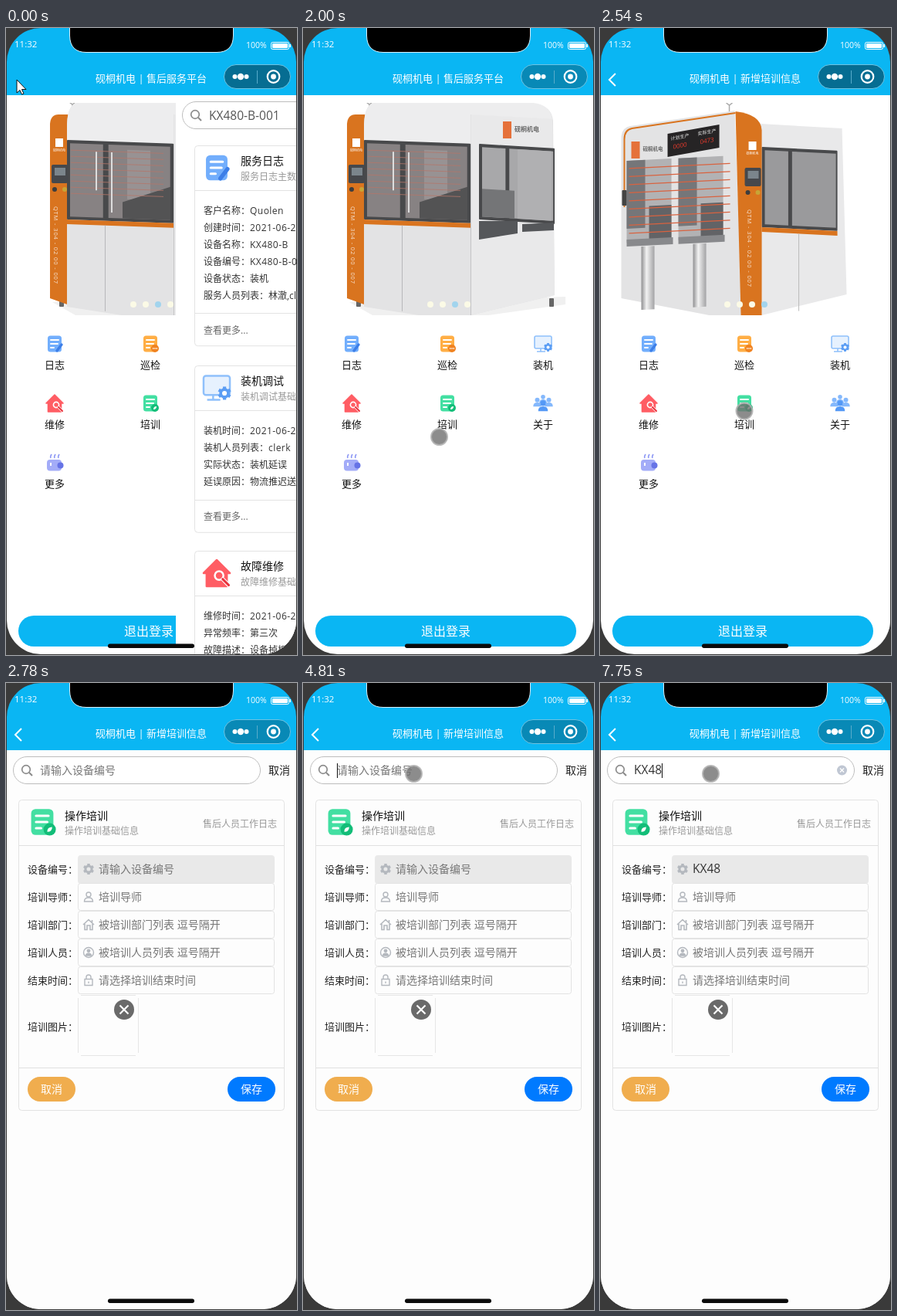
These frames come from a looping animation (377 by 812 pixels, 8 s). An HTML page:

```html
<!DOCTYPE html>
<html lang="zh-CN">
<head>
<meta charset="utf-8">
<title>售后服务平台</title>
<style>
html, body { margin: 0; width: 100%; height: 100%; overflow: hidden; background: #3a3a3a; }
svg { display: block; width: 377px; height: 812px; }
text { font-family: "Open Sans", "Noto Sans CJK SC", "Noto Sans CJK", sans-serif; white-space: pre; }
</style>
</head>
<body>
<svg id="stage" viewBox="0 0 377 812"></svg>
<script>
const BLUE = '#0ab6f3', ORANGE = '#d9741f', GREY = '#b4b8be';
const BRAND = '砚桐机电', CODE = 'QTM - 304 - 02 00 - 007';

// Markup helpers; text is placed by its vertical centre.
const text = (x, y, s, size, fill = '#333', more = '') =>
  `<text x="${x}" y="${y + size * .37}" font-size="${size}" fill="${fill}" ${more}>${s}</text>`;
const mid = 'text-anchor="middle"', round = 'stroke-linecap="round"';
const outline = (color, w = 1) => `stroke="${color}" stroke-width="${w}"`;
const rect = (x, y, w, h, rx, fill, more = '') =>
  `<rect x="${x}" y="${y}" width="${w}" height="${h}" rx="${rx}" fill="${fill}" ${more}/>`;
const dot = (x, y, r, fill, more = '') => `<circle cx="${x}" cy="${y}" r="${r}" fill="${fill}" ${more}/>`;
const shape = (d, fill, more = '') => `<path d="${d}" fill="${fill}" ${more}/>`;
const line = (d, stroke, w = 1, more = '') => shape(d, 'none', `${outline(stroke, w)} ${more}`);
const group = (id, body) => `<g id="${id}">${body}</g>`;
const at = (x, y, k, body) => `<g transform="translate(${x} ${y}) scale(${k})">${body}</g>`;
const face = (x, y, slope, body) => `<g transform="matrix(1 ${slope} 0 1 ${x} ${y})">${body}</g>`;
const rows = (n, f) => Array.from({ length: n }, (_, i) => f(i)).join('');

// Icons, drawn about their centre in a 24 unit box
const doc = (color, badge) => rect(-9, -10.5, 18, 21, 3.5, color) +
  line('M-5 -5H5M-5 0H4M-5 5H-1', '#fff', 2, round) + badge;
const blueDoc = doc('#72aefc', line('M3 9L9 1', '#3d7fe8', 3.4, round));
const orangeDoc = doc('#ffae45', dot(6, 6, 5, '#f08322') + line('M3 6H9', '#fff', 1.4, 'stroke-dasharray="1.4 .9"'));
const greenDoc = doc('#43dfa2', dot(6, 6, 5, '#12bd78') + shape('M4 8Q4 4 8 4Q8 8 4 8', '#fff'));
const gear = (r, color, hole) =>
  rows(3, i => `<g transform="rotate(${i * 60})">${line(`M0 ${-r}V${r}`, color, r * .5)}</g>`) +
  dot(0, 0, r * .8, color) + dot(0, 0, r * .36, hole);
const monitor = rect(-11, -10, 22, 16, 2, '#e6f1fe', outline('#8fc0fb', 1.6)) +
  line('M-3 6V10M-8 10H3', '#8fc0fb', 1.6) + at(6.5, 4.5, 1, gear(5.5, '#5b9df4', '#fff'));
const house = shape('M-11 0L0 -11L11 0H8.5V11H-8.5V0Z', '#ff5d64', `${outline('#ff5d64', 1.6)} stroke-linejoin="round"`) +
  dot(2, 2, 3.6, 'none', outline('#fff', 1.6)) + line('M5 5L11 11', '#fff', 3.4) + line('M5 5L10 10', '#e8323c', 2, round);
const person = (x, y, k, color) =>
  at(x, y, k, dot(0, -4.5, 4, color) + shape('M-7 7Q-7 0 0 0Q7 0 7 7Z', color));
const people = rows(2, i => person(i * 15 - 7.5, -1, .75, '#84b8fc')) +
  person(0, -5, .7, '#84b8fc') + person(0, 4, .9, '#5499f6');
const cup = rect(-10, -4, 19, 14.5, 4, '#a3acf8') + dot(7.5, 3.5, 4, '#6673e6') + line('M-5 0V4', '#fff', 2) +
  rows(3, i => line(`M${i * 5 - 5} -6q-1 -2 1 -5`, '#8e99f5', 1.6));
const lens = (x, y) => dot(x, y, 5.3, 'none', outline('#8a8a8a', 1.7)) + line(`M${x + 4} ${y + 4}l4 4`, '#8a8a8a', 2);
const cross = (x, y, r, color, a, w) => dot(x, y, r, color) +
  line(`M${x - a} ${y - a}l${2 * a} ${2 * a}m0 ${-2 * a}l${-2 * a} ${2 * a}`, '#fff', w);

// Parts shared by both machine views
const glazing = (w, h, tint) => rect(0, 0, w, h, 1, '#48494b') +
  rows(2, i => rect(4 + i * w * .36, 4, w * (i ? .58 : .31), h - 8, 0, tint));
const beacon = (x, y) => line(`M${x} ${y + 11}v-11m-4 -2l4 3l4 -3`, '#aaa', 1.5);
const brand = (x, y, size) => rect(x, y - 10, 11, 22, 0, '#e5713a') + text(x + 15, y, BRAND, size, '#666', 'font-weight="bold"');
const column = (x, y) => rect(x - 5, y, 10, 11, 0, '#fff') + text(x, y + 16, BRAND, 4, '#fff', mid) +
  text(0, 0, CODE, 7.5, '#f6e3d3', `transform="translate(${x - 4} ${y + 88}) rotate(90)" letter-spacing=".9"`) +
  at(x - 10, y + 34, 1, rect(0, 0, 21, 24, 2, '#46484c') + rect(4, 4, 14, 10, 0, '#7b858c') +
    dot(4, 32, 3, '#3d3d3d') + dot(17, 32, 3, '#c8a436'));

const sideView = shape('M60 355L340 348V358L240 372H90Z', '#f0f0f0') + beacon(86, 98) +
  rows(2, i => rect(69 + i * 250, 350, 6, 11, 1, '#666')) +
  shape('M57 350V124Q58 112 68 112H82V359Z', ORANGE) +
  shape('M79 361V125Q80 97 94 97L298 98Q322 100 324 120L326 346L218 372H150Z', '#e3e3e4') +
  shape('M218 372V110L323 118L326 346Z', '#e9e9ea') + shape('M79 146V125Q80 97 94 97H298Q320 99 323 118L217 112V150Z', '#ededee') +
  face(79, 145, .035, glazing(138, 103, '#878283') + rect(78, 10, 30, 64, 0, '#aaa4a4', 'opacity=".5"') +
    shape('M72 99V78L134 56V99Z', '#535354') + rows(8, i => line(`M5 ${13 + i * 8}h120`, '#b4776a', .8)) +
    rows(2, i => line(`M${38 + i * 20} 14v${50 + i * 28}`, '#ddd', 2)) +
    rect(0, 103, 138, 6, 0, ORANGE) + line('M49.500 109V220', '#b8b8ba')) +
  face(228, 150, .06, glazing(98, 98, '#a8a8aa') + rect(4, 58, 42, 36, 0, '#747577') + rect(50, 4, 44, 90, 0, '#b0b0b2')) +
  shape('M228 250H278V266L228 274ZM284 254L325 252V262L284 264Z', '#55575a') + line('M217.500 150V372', '#c4c4c6') +
  brand(259, 131, 8) + column(69, 143);

const bay = x => rect(x, 0, 58, 106, 0, '#b2b2b4') + rect(x, 0, 24, 88, 0, '#757679') +
  rect(x + 29, 60, 29, 46, 0, '#626366') + rect(x, 102, 60, 9, 0, '#88898c') +
  rect(x + 19, 112, 17, 82, 0, 'url(#steel)');
const sign = (x, label, count) => text(x, 7, label, 6, '#eee', mid) + text(x, 18, count, 8, '#e53a2c', mid);
const frontView = beacon(296, 99) +
  shape('M336 124L442 130L448 345L338 372Z', '#e9e9ea') +
  face(338, 154, .05, glazing(98, 104, '#9a9a9c') + rect(0, 104, 98, 6, 0, ORANGE) + line('M48 110V210', '#bbb')) +
  shape('M156 350V140Q158 128 168 127L303 107L313 372H270Z', '#e3e3e4') +
  line('M160 232V144Q160 132 170 130L304 110', ORANGE, 2) + brand(169, 157, 6.5) +
  face(216, 137, -.18, rect(0, 0, 67, 30, 0, '#262425') + sign(16, '计划生产', '0000') + sign(51, '实际生产', '0473')) +
  face(163, 172, -.05, bay(0) + bay(67) + rows(9, i => line(`M3 ${10 + i * 10.5}h131`, '#d9623f', 1.2))) +
  shape('M304 108Q337 112 338 132V372H311Z', ORANGE) + rect(157, 210, 6, 20, 1, '#444') + column(326, 147);

const apps = [[blueDoc, '日志'], [orangeDoc, '巡检'], [monitor, '装机'], [house, '维修'], [greenDoc, '培训'], [people, '关于'], [cup, '更多']];
const home = rect(1, 87, 375, 725, 0, '#fff') +
  `<g clip-path="url(#banner)">${group('slideA', sideView)}${group('slideB', frontView)}</g>` +
  rows(4, i => dot(165 + i * 16, 358, 4, '', `id="page${i}"`)) +
  rows(apps.length, i => at(63 + i % 3 * 124, 409 + Math.floor(i / 3) * 77, 1,
    apps[i][0] + text(0, 27, apps[i][1], 13, '#111', mid))) +
  rect(16, 761, 338, 40, 20, BLUE) + text(185, 781, '退出登录', 16, '#fff', mid);

const border = outline('#e3e3e3');
const pill = x => rect(x + .5, 95.5, 320, 35, 17.5, '#fff', outline('#bdbdbd')) + lens(x + 17, 112);
// Latin values are set slightly wider than their labels.
const entry = s => s.replace(/[\w-]+/, '<tspan letter-spacing=".45">$&</tspan>');
const card = (y, icon, name, note, items) => {
  const foot = 109 + items.length * 21.7;
  return at(244, y, 1, rect(.5, .5, 344, foot + 20, 4, '#fff', border) + at(29, 29, 1.55, icon) +
    text(60, 20, name, 14, '#111') + text(60, 41, note, 12, '#999') +
    items.map((s, i) => text(12, 85 + i * 21.9, entry(s), 12)).join('') +
    line(`M0 58.500h344M0 ${Math.round(foot) - 21.5}h344`, '#e3e3e3') + text(12, foot, '查看更多...', 12, '#666'));
};
const list = rect(220, 87, 375, 725, 0, '#fff') + pill(228) + text(263, 113, 'KX480-B-001', 15.5, '#555') +
  card(152, blueDoc, '服务日志', '服务日志主数据', ['客户名称：Quolen', '创建时间：2021-06-24',
    '设备名称：KX480-B', '设备编号：KX480-B-001', '设备状态：装机', '服务人员列表：林澈,clerk']) +
  card(437, monitor, '装机调试', '装机调试基础信息', ['装机时间：2021-06-24', '装机人员列表：clerk',
    '实际状态：装机延误', '延误原因：物流推迟送达']) +
  card(677, house, '故障维修', '故障维修基础信息', ['维修时间：2021-06-24', '异常频率：第三次', '故障描述：设备掉板']);

const ring = (y, r) => dot(0, y, r, 'none', outline(GREY, 1.4));
const fields = [
  ['设备编号：', '请输入设备编号', gear(7, GREY, '#e9e9e9')],
  ['培训导师：', '培训导师', ring(-3, 3) + line('M-5.500 6Q-5.500 1 0 1Q5.500 1 5.500 6Z', GREY, 1.4)],
  ['培训部门：', '被培训部门列表 逗号隔开', line('M-7 0L0 -6.500L7 0M-5 -1V6.500H-2V1H2V6.500H5V-1M4.500 -6V-3', GREY, 1.6)],
  ['培训人员：', '被培训人员列表 逗号隔开', ring(0, 6.5) + person(0, .5, .6, GREY)],
  ['结束时间：', '请选择培训结束时间', line('M-5 -1.500H5V6.500H-5ZM-3 -1.500V-4Q-3 -7 0 -7Q3 -7 3 -4V-1.500M0 1.500V4', GREY, 1.4)]
];
const field = ([label, hint, icon], i) => at(0, 241 + i * 36, 1,
  rect(93.5, -17.5, 254, i ? 35 : 36, 3, i ? '#fdfdfd' : '#e9e9e9', outline(i ? '#e3e3e3' : '#e9e9e9')) +
  text(28, 0, label, 13, '#222') + at(107, 0, 1, icon) + text(120, 0, hint, 14, '#777', `id="field${i}"`));
const button = (x, s, color) => rect(x, 510, 62, 32, 16, color) + text(x + 31, 526, s, 14, '#fff', mid);
const ime = line('', '#444', 1, 'stroke-dasharray="1 1" id="under"') +
  rect(44.5, 124.5, 0, 43, 0, '#f3f3f3', `id="panel" ${outline('#cfcfcf')}`) +
  rect(45, 125, 0, 42, 0, '#a3d4fd', 'id="cell"') + text(57, 146, '1', 18, '#3d5970') + text(76, 146, '', 20, '#111', 'id="candidate"') +
  group('tools', line('M.5 125v42m65 -42v42', '#d5d5d5') + line('M17 141l-5 5l5 5M48 141l5 5l-5 5', '#999', 1.2) +
    at(90, 146, 1, dot(0, 0, 7.3, 'none', outline('#222', 1.3)) + rows(2, i => dot(i * 5 - 2.5, -2, 1, '#222')) +
      line('M-4 2Q0 6.500 4 2', '#222', 1.2)));
const form = rect(1, 87, 375, 725, 0, '#fdfdfd') + pill(9) + text(340, 113, '取消', 14, '#222') +
  rect(16.5, 151.5, 344, 402, 4, '#fdfdfd', border) + line('M17 210.500H360M17 498.500H360', '#e0e0e0') +
  at(47, 180, 1.6, greenDoc) + text(76, 172, '操作培训', 14, '#111') + text(76, 192, '操作培训基础信息', 12, '#999') +
  text(351, 183, '售后人员工作日志', 12, '#999', 'text-anchor="end"') + fields.map(field).join('') +
  text(28, 445, '培训图片：', 13, '#222') +
  line('M93.500 408V479M171.500 408V479M97 404.500H168M97 482.500H168', '#e6e6e6') + cross(153, 423, 13, '#6a6a6a', 5.5, 2.2) +
  button(28, '取消', '#f0ad4e') + button(287, '保存', '#007aff') +
  text(44, 113, '', 14, '#777', 'id="query"') + group('clear', cross(313.5, 113, 6.5, '#c0c7d3', 2.5, 1.3)) +
  group('ime', ime) + rect(44, 104, 1, 19, 0, '#111', 'id="caret"');

const header = rect(1, 0, 375, 87, 0, BLUE) + text(11, 21, '11:32', 11.5, '#fff') + text(311, 22.5, '100%', 10.5, '#fff') +
  rect(343.5, 18.5, 23, 9, 2, 'none', outline('#fff')) + rect(345, 20, 20, 6, 1, '#fff') + rect(367.5, 21, 1.5, 4, 0, '#fff') +
  shape('M82.500 -1V10Q83 31.500 104 31.500H273Q294 31.500 294.500 10V-1', '#000', outline('#d8f1fb')) +
  text(188, 65, '', 13, '#fff', `id="title" ${mid}`) + line('M20 59L12 67L20 75', '#fff', 2, 'id="back"') +
  rect(282.5, 47.5, 86, 31, 15.5, '#000', `id="capsule" ${outline('#6cc3e2')}`) + line('M325.500 55V72', '#58acca') +
  rows(3, i => dot(296.5 + i * 7.5, 63, i === 1 ? 4.2 : 3, '#fff')) +
  dot(346.5, 63, 7.8, 'none', outline('#fff', 2.2)) + dot(346.5, 63, 3.4, '#fff');

const $ = id => document.getElementById(id);
const set = (id, name, value) => $(id).setAttribute(name, value);
const show = (id, on) => set(id, 'display', on ? 'inline' : 'none');
const move = (id, x, y = 0) => set(id, 'transform', `translate(${x} ${y})`);

$('stage').innerHTML =
  `<defs><clipPath id="phone">${rect(1, 0, 375, 811, 44)}</clipPath><clipPath id="banner">${rect(1, 97, 375, 275, 0)}</clipPath>
  <linearGradient id="steel"><stop stop-color="#8f8f91"/><stop offset=".4" stop-color="#f2f2f2"/><stop offset="1" stop-color="#a2a2a4"/></linearGradient></defs>
  <g clip-path="url(#phone)">${group('home', home)}${group('list', list)}${group('form', form)}${header}${rect(132, 797.5, 112, 5.5, 2.7, '#0b0b0b')}</g>` +
  dot(0, 0, 10.5, '#6f6f6f', `id="touch" fill-opacity=".8" stroke-opacity=".85" ${outline('#b2b2b2', 2)}`) +
  shape('M14 67v17l4 -3.500l2.500 5.500l2.500 -1l-2.500 -5.500h5.500Z', '#fff', `id="arrow" ${outline('#111')}`);

const span = (t, a, b) => Math.min(1, Math.max(0, (t - a) / (b - a)));
const out = p => 1 - (1 - p) ** 2;
const within = (t, a, b) => t >= a && t < b;

const POP = 120, SWIPE = 2060, PUSH = 2540, FOCUS = 3780, COMMIT = 6630;
const keys = [5510, 5660, 7470, 7750];
// Pointer strokes: start, end, and where each one comes to rest
const strokes = [[120, 840, 212, 505], [970, 1330, 164.5, 560.5], [1640, 2000, 176.5, 529.5],
  [2030, 2150, 187, 496], [2780, 3280, 155.5, 197.5], [3300, 3700, 143.5, 117.5]];
const pointer = t => strokes.reduce(([x, y], [a, b, nx, ny]) => {
  const p = out(span(t, a, b));
  return [x + (nx - x) * p, y + (ny - y) * p];
}, [14, 67]);

function fill(id, value) {
  $(id).textContent = value || '请输入设备编号';
  set(id, 'font-size', value ? 15.5 : 14);
  set(id, 'fill', value ? '#333' : '#777');
}

function draw(t) {
  const onForm = t >= PUSH, pop = out(span(t, POP, POP + 240)), push = out(span(t, PUSH, PUSH + 240));
  move('list', 156 * pop);
  show('list', pop < 1);
  show('form', onForm);
  move('form', 375 * (1 - push));
  set('capsule', 'fill-opacity', .4 - .15 * (onForm ? push : pop));
  $('title').textContent = BRAND + ' | ' + (onForm ? '新增培训信息' : '售后服务平台');
  set('title', 'font-weight', onForm ? 500 : 400);
  show('back', onForm);

  const slide = 375 * out(span(t, SWIPE, SWIPE + 500));
  move('slideA', -slide);
  move('slideB', 246 - slide);
  for (let i = 0; i < 4; i++) set('page' + i, 'fill', i === (slide ? 3 : 2) ? '#a2d4ed' : '#fbfae6');

  const typed = 'KX48'.slice(0, keys.filter(k => k <= t).length), done = t >= COMMIT;
  fill('query', typed);
  fill('field0', done ? typed : '');
  show('clear', done);
  show('ime', typed && !done);
  const end = 44 + (typed && Math.round($('query').getComputedTextLength()));
  const cell = typed.length < 2 ? 57 : 69;
  $('candidate').textContent = typed;
  set('cell', 'width', cell);
  set('panel', 'width', cell + 115);
  move('tools', cell + 45);
  set('under', 'd', `M45 122.500H${end}`);

  // The caret blinks afresh after every edit.
  const edit = Math.max(...[FOCUS, COMMIT, ...keys].filter(k => k <= t));
  set('caret', 'x', end);
  show('caret', t >= FOCUS && (t - edit) % 1030 < 515);

  move('touch', ...pointer(t));
  show('arrow', t < POP);
  show('touch', t >= POP && !within(t, 2780, 3280) && !within(t, 5360, 5800));
}

const start = performance.now();
(function frame() {
  draw((performance.now() - start) % 8000);
  requestAnimationFrame(frame);
})();
</script>
</body>
</html>
```
